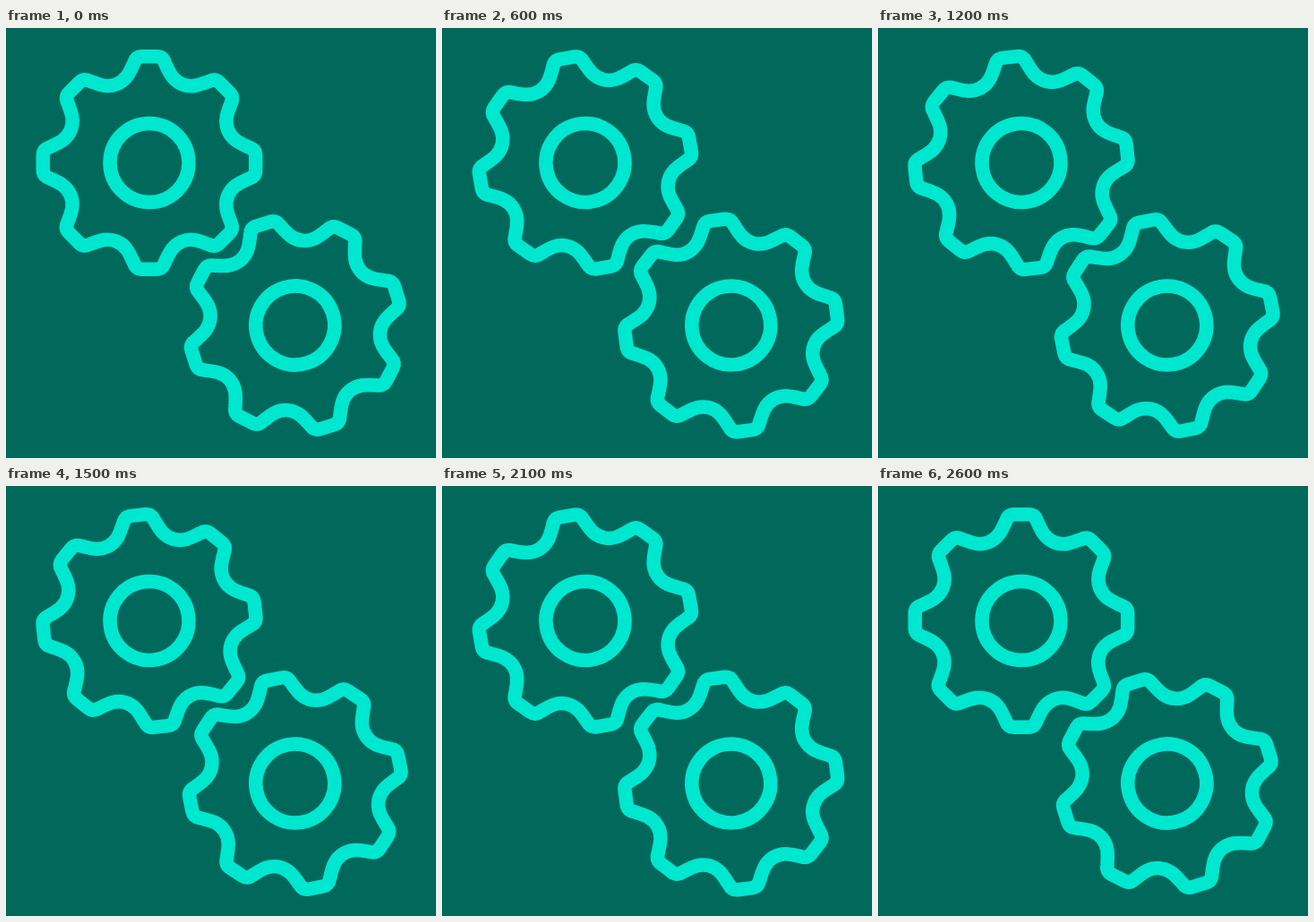
Recreate the animation shown at these times as an HTML page with a canvas. Size 480 by 480 pixels, loop 2.7 s.

```html
<!DOCTYPE html>
<html lang="en">
<head>
<meta charset="utf-8">
<title>Gears</title>
<style>
  html, body { margin: 0; height: 100%; overflow: hidden; background: #00695c; }
  canvas { display: block; }
</style>
</head>
<body>
<canvas id="stage" width="480" height="480"></canvas>
<script>
const ctx = document.getElementById('stage').getContext('2d');
const LOOP = 2700, STEP = 100, TEETH = 8;

// One tooth pointing up, from valley to valley.
const tooth = new Path2D(`M-36.4-87.8C-25.3-92.4-22-101.5-17.3-111.5Q-14.8-118.7-8-118.7
  L8-118.7Q14.8-118.7 17.3-111.5C22-101.5 25.3-92.4 36.4-87.8`);

const outline = new Path2D();
for (let i = 0; i < TEETH; i++) {
  outline.addPath(tooth, new DOMMatrix().rotate(i * 360 / TEETH));
}
outline.moveTo(44, 0);
outline.arc(0, 0, 44, 0, 2 * Math.PI);

// Swings forward and back once per loop, after a short rest.
function angleAt(t) {
  const phase = 2 * Math.PI * Math.max(t, STEP) / LOOP;
  return 42.7 - 43.8 * Math.cos(phase);
}

function gear(x, y, degrees) {
  ctx.save();
  ctx.translate(x, y);
  ctx.rotate(degrees * Math.PI / 180);
  ctx.stroke(outline);
  ctx.restore();
}

function draw() {
  const t = Math.floor(performance.now() % LOOP / STEP) * STEP;
  const angle = angleAt(t);
  ctx.fillStyle = '#00695c';
  ctx.fillRect(0, 0, 480, 480);
  ctx.strokeStyle = '#00e7cf';
  ctx.lineWidth = 15.5;
  ctx.lineCap = ctx.lineJoin = 'round';
  gear(160, 150.5, angle);
  gear(322.8, 332, -17.4 - angle);
  requestAnimationFrame(draw);
}
draw();
</script>
</body>
</html>
```
